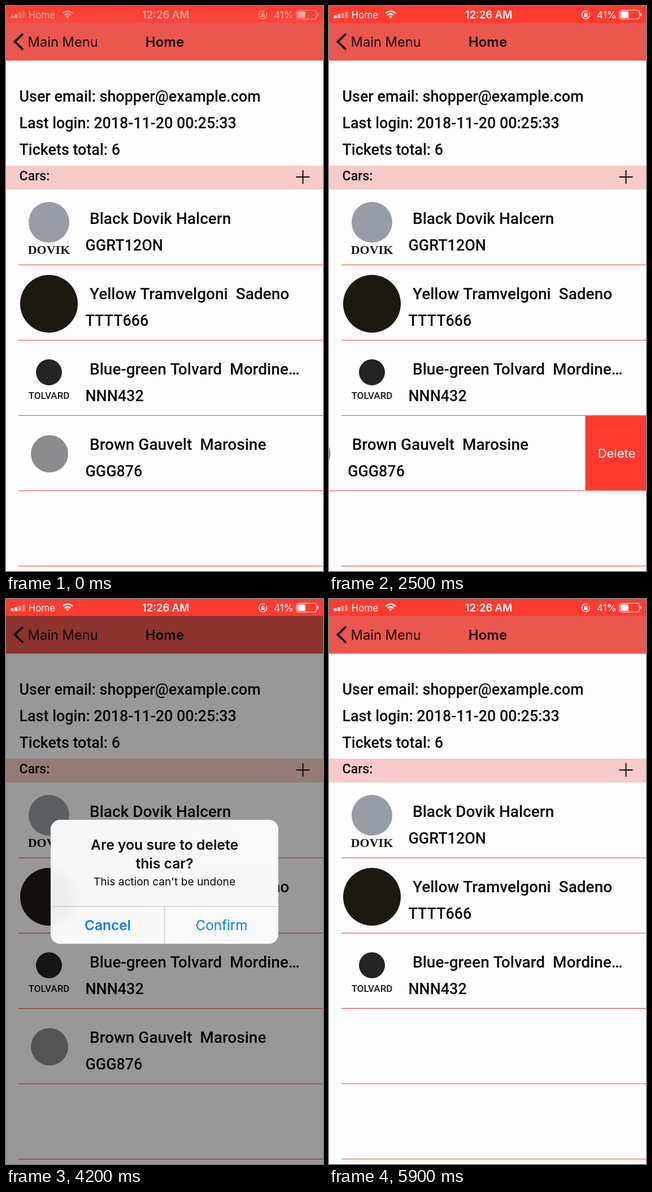
Write an HTML page with a canvas that moves like this. It is 561 px wide and 998 px high and loops after 6000 ms.

```html
<!DOCTYPE html>
<html lang="en">
<head>
<meta charset="utf-8">
<title>Car list</title>
<style>
html, body { margin: 0; width: 100%; height: 100%; overflow: hidden; background: #fefdfe; }
canvas { display: block; width: 100vw; height: 100vh; }
</style>
</head>
<body>
<canvas id="stage" width="561" height="998"></canvas>
<script>
const W = 561, H = 998, LOOP = 6000, STEP = 100;
const ROW_TOP = 324, ROW_H = 133, DELETE_W = 110;
const UI = 'Inter, sans-serif', BODY = 'Roboto, sans-serif', SERIF = '"Liberation Serif", serif';
const RED = '#ff3b30', PAPER = '#fefdfe', INK = '#0b0b0b', LINE = '#f2615b', BLUE = '#0a7ff2';

const stage = document.getElementById('stage');
const screen = stage.getContext('2d');
const card = document.createElement('canvas');
card.width = W;
card.height = H;
const cardCtx = card.getContext('2d');

const cars = [
  { name: 'Black Dovik Halcern', plate: 'GGRT12ON', badge: [76, 58, 36, '#989ca4'],
    caption: ['DOVIK', 114, `bold 22px ${SERIF}`] },
  { name: 'Yellow Tramvelgoni  Sadeno', plate: 'TTTT666', badge: [76, 69, 51, '#1c1812'] },
  { name: 'Blue-green Tolvard  Mordine…', plate: 'NNN432', badge: [76, 57, 23, '#242424'],
    caption: ['TOLVARD', 104, `500 17px ${BODY}`] },
  { name: 'Brown Gauvelt  Marosine', plate: 'GGG876', badge: [77, 68, 33, '#8c8c8e'] }
];

function smooth(t, from, to) {
  const x = Math.min(1, Math.max(0, (t - from) / (to - from)));
  return x * x * (3 - 2 * x);
}

function text(c, str, x, y, font, color = INK, align = 'left') {
  c.font = font;
  c.fillStyle = color;
  c.textAlign = align;
  c.fillText(str, x, y);
}

function rect(c, x, y, w, h, color) {
  c.fillStyle = color;
  c.fillRect(x, y, w, h);
}

function disc(c, x, y, r, color) {
  c.fillStyle = color;
  c.beginPath();
  c.arc(x, y, r, 0, Math.PI * 2);
  c.fill();
}

function box(c, x, y, w, h, r) {
  c.beginPath();
  c.roundRect(x, y, w, h, r);
}

function stroke(c, points, color, width) {
  c.strokeStyle = color;
  c.lineWidth = width;
  c.beginPath();
  points.forEach(([x, y], i) => i ? c.lineTo(x, y) : c.moveTo(x, y));
  c.stroke();
}

function drawNav(c) {
  rect(c, 0, 30, W, 66.5, '#ea574f');
  stroke(c, [[30, 49], [15.5, 63], [30, 77]], INK, 3.8);
  text(c, 'Main Menu', 38.5, 72, `400 23.7px ${UI}`, '#1a0d0c');
  text(c, 'Home', 281, 72, `600 24px ${UI}`, INK, 'center');
}

function drawProfile(c) {
  const font = `500 26.9px ${BODY}`;
  text(c, 'User email: shopper@example.com', 23.5, 169, font);
  text(c, 'Last login: 2018-11-20 00:25:33', 23.5, 216, font);
  text(c, 'Tickets total: 6', 23.5, 263, font);
  rect(c, 0, 282, W, 42, '#f8cac8');
  text(c, 'Cars:', 23.5, 308, `500 23.2px ${BODY}`);
  stroke(c, [[513.5, 302], [537.5, 302]], INK, 2);
  stroke(c, [[525.5, 290], [525.5, 314]], INK, 2);
}

function drawCar(c, car, top, shift) {
  const [x, y, r, color] = car.badge;
  disc(c, x - shift, top + y, r, color);
  if (car.caption) text(c, car.caption[0], x - shift, top + car.caption[1], car.caption[2], '#16161a', 'center');
  text(c, car.name, 148 - shift, top + 61, `500 28px ${BODY}`);
  text(c, car.plate, 140.5 - shift, top + 108, `500 26.9px ${BODY}`);
}

function drawList(c, shift, gone) {
  const last = cars.length - 1;
  cars.forEach((car, i) => {
    c.globalAlpha = i === last ? 1 - gone : 1;
    drawCar(c, car, ROW_TOP + i * ROW_H, i === last ? shift : 0);
  });
  c.globalAlpha = 1;

  if (shift > 0) {
    const left = W - shift, top = ROW_TOP + last * ROW_H;
    rect(c, left, top, shift, ROW_H, RED);
    text(c, 'Delete', left + 22, top + 75, `400 22px ${UI}`, '#fff');
  }

  for (let i = 1; i <= 6; i++) {
    const y = ROW_TOP + i * ROW_H - (i > last ? gone * ROW_H : 0);
    const swiped = i === last + 1 ? shift : 0;
    const left = Math.max(0, 22 - swiped);
    rect(c, left, y - 0.3, W - swiped - left, 1.3, LINE);
  }
}

function drawAlert(c, shown, scale) {
  const k = cardCtx;
  k.clearRect(0, 0, W, H);
  k.save();
  k.translate(280.5, 499.5);
  k.scale(scale, scale);
  k.translate(-280.5, -499.5);
  box(k, 79, 390, 403, 219, 17);
  k.clip();
  k.filter = 'blur(16px)';
  k.drawImage(stage, 0, 0);
  k.filter = 'none';
  rect(k, 79, 390, 403, 219, 'rgba(249,249,250,.95)');

  text(k, 'Are you sure to delete', 280.5, 443, `600 24.7px ${UI}`, INK, 'center');
  text(k, 'this car?', 280.5, 476, `600 24.7px ${UI}`, INK, 'center');
  text(k, "This action can't be undone", 280.5, 506, `400 19.1px ${UI}`, INK, 'center');
  rect(k, 79, 542.5, 403, 1.2, '#c8c8cb');
  rect(k, 280, 543, 1.2, 66, '#c8c8cb');
  text(k, 'Cancel', 180, 585, `600 24.4px ${UI}`, BLUE, 'center');
  text(k, 'Confirm', 381.5, 585, `400 24.2px ${UI}`, BLUE, 'center');
  k.restore();

  rect(c, 0, 30, W, H - 30, `rgba(0,0,0,${0.4 * shown})`);
  c.globalAlpha = shown;
  c.drawImage(card, 0, 0);
  c.globalAlpha = 1;
}

function drawWifi(c, x, y) {
  c.lineWidth = 2.6;
  for (const r of [7.6, 12.2]) {
    c.beginPath();
    c.arc(x, y, r, -Math.PI * 0.75, -Math.PI * 0.25);
    c.stroke();
  }
  c.beginPath();
  c.moveTo(x, y);
  c.arc(x, y, 4.4, -Math.PI * 0.75, -Math.PI * 0.25);
  c.fill();
}

function drawLock(c, x, y) {
  c.lineWidth = 1.3;
  c.beginPath();
  c.arc(x, y, 7, -0.6, Math.PI * 2 - 1.1);
  c.stroke();
  c.fillRect(x - 3.2, y - 0.8, 6.4, 4.6);
  c.beginPath();
  c.arc(x, y - 1, 2.1, Math.PI, 0);
  c.stroke();
}

function drawStatus(c, alpha) {
  rect(c, 0, 0, W, 30, RED);
  const haze = c.createLinearGradient(0, 0, 0, 30);
  haze.addColorStop(0, 'rgba(234,87,79,0)');
  haze.addColorStop(1, `rgba(234,87,79,${1 - alpha})`);
  rect(c, 0, 0, W, 30, haze);

  c.strokeStyle = '#fff';
  for (let i = 0; i < 4; i++) {
    c.globalAlpha = alpha * (i < 2 ? 1 : 0.4);
    c.fillStyle = '#fff';
    const h = 5 + i * 2.2;
    box(c, 8.5 + i * 6.7, 21.5 - h, 5, h, 1);
    c.fill();
  }
  c.globalAlpha = alpha;
  text(c, 'Home', 39.5, 21.5, `400 17px ${UI}`, '#fff');
  drawWifi(c, 109, 21.5);
  text(c, '12:26 AM', 282.5, 21.5, `600 18.4px ${UI}`, '#fff', 'center');
  drawLock(c, 454.5, 15.5);
  text(c, '41%', 474, 21.5, `400 17.2px ${UI}`, '#fff');

  c.lineWidth = 1.1;
  box(c, 514, 7.5, 35.5, 15.5, 4);
  c.stroke();
  box(c, 516, 9.5, 14, 11.5, 2);
  c.fill();
  box(c, 551, 12.5, 2, 5.5, 1);
  c.fill();
  c.globalAlpha = 1;
}

function swipe(t) {
  if (t < 2000) return 0;
  if (t < 3200) return DELETE_W - 74 * Math.exp((2000 - t) / 150);
  return DELETE_W * (1 - smooth(t, 3200, 3525));
}

function draw(t) {
  const c = screen;
  const opening = smooth(t, 3240, 3433);
  const shown = opening * (1 - smooth(t, 4800, 5200));

  rect(c, 0, 0, W, H, PAPER);
  drawNav(c);
  drawProfile(c);
  drawList(c, swipe(t), smooth(t, 5600, 5900));
  if (shown > 0) drawAlert(c, shown, 1 + 0.15 * (1 - opening));
  drawStatus(c, Math.min(1, 0.5 + t / 400));
}

let drawn = -1;
function tick(now) {
  const t = Math.floor(((now + 1) % LOOP) / STEP) * STEP;
  if (t !== drawn) draw(drawn = t);
  requestAnimationFrame(tick);
}
draw(0);
requestAnimationFrame(tick);
</script>
</body>
</html>
```
